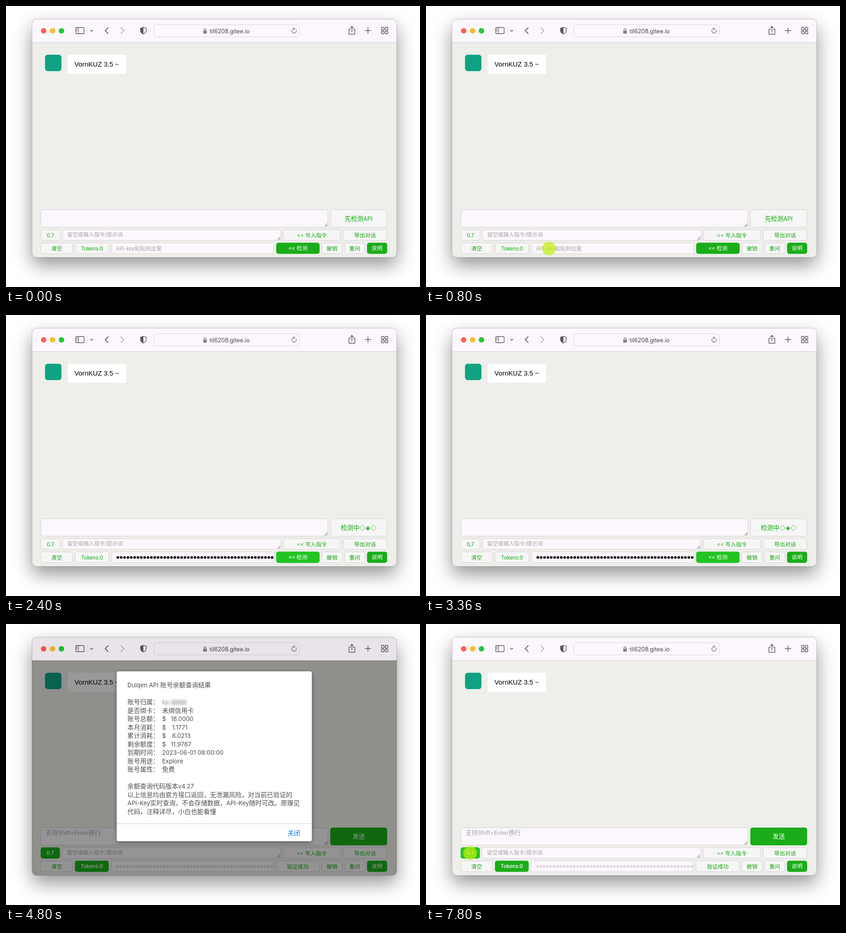
These frames come from a looping animation (907 by 617 pixels, 8000 ms). An HTML page:

```html
<!DOCTYPE html>
<html lang="zh-CN">
<head>
<meta charset="utf-8">
<title>API 余额查询</title>
<style>
  html, body { margin: 0; width: 100%; height: 100%; overflow: hidden; background: #fff; }
  #shadow {
    position: absolute; left: 57px; top: 29px; width: 799px; height: 523px; border-radius: 10px;
    box-shadow: 0 17px 40px rgba(0, 0, 0, .42), 0 0 1px rgba(0, 0, 0, .5);
  }
  svg { position: absolute; left: 0; top: 0; display: block; }
  text { font-family: "Noto Sans CJK SC", "Noto Sans CJK", Inter, sans-serif; white-space: pre; }
  .latin { font-family: Inter, "Noto Sans", sans-serif; font-size: .94em; }
  .arial { font-family: "Liberation Sans", Arial, sans-serif; }
  .icon { fill: none; stroke: #5b585b; stroke-width: 1.4; stroke-linecap: round; stroke-linejoin: round; }

  .phase, #pointer { animation: 8s step-end infinite; }
  #setup { animation-name: setup; }
  #unchecked { animation-name: unchecked; }
  #emptyKey { animation-name: emptyKey; }
  #typedKey { animation-name: typedKey; }
  #checking { animation-name: checking; }
  #ready { animation-name: ready; }
  #dialog { animation-name: dialog; }
  #hover { animation-name: hover; }
  #pointer { animation-name: pointer; }
  @keyframes setup { 0% { opacity: 1 } 50%, 100% { opacity: 0 } }
  @keyframes unchecked { 0% { opacity: 1 } 30%, 100% { opacity: 0 } }
  @keyframes emptyKey { 0% { opacity: 1 } 20%, 100% { opacity: 0 } }
  @keyframes typedKey { 0% { opacity: 0 } 20% { opacity: 1 } 30%, 100% { opacity: 0 } }
  @keyframes checking { 0% { opacity: 0 } 30% { opacity: 1 } 50%, 100% { opacity: 0 } }
  @keyframes ready { 0% { opacity: 0 } 50%, 100% { opacity: 1 } }
  @keyframes dialog { 0% { opacity: 0 } 60% { opacity: 1 } 97.5%, 100% { opacity: 0 } }
  @keyframes hover { 0% { opacity: 0 } 97.5%, 100% { opacity: 1 } }
  @keyframes pointer {
    0% { opacity: 0; transform: translate(269.5px, 532.5px) }
    10% { opacity: 1; transform: translate(269.5px, 532.5px) }
    20% { opacity: 1; transform: translate(636.5px, 533px) }
    30% { opacity: 0; transform: translate(636.5px, 533px) }
    50% { opacity: 1; transform: translate(187.5px, 532px) }
    60% { opacity: 0; transform: translate(187.5px, 532px) }
    97.5%, 100% { opacity: 1; transform: translate(96.5px, 503px) }
  }
</style>
</head>
<body>
<div id="shadow"></div>
<svg id="stage" width="907" height="617" viewBox="0 0 907 617"></svg>
<script>
const GREEN = '#1aad19', BRIGHT = '#22c422', LABEL = '#14a514', PAPER = '#fcf7fc', HINT = '#a6a3a6';

const escape = s => s.replace(/</g, '&lt;');
const runs = s => s.replace(/[\x20-\x7e]+/g, r => `<tspan class="latin">${escape(r)}</tspan>`);
const text = (x, y, s, size, fill, extra = '') =>
  `<text x="${x}" y="${y}" font-size="${size}" fill="${fill}" ${extra}>${runs(s)}</text>`;
const box = (x1, y1, x2, y2, r, fill, extra = '') =>
  `<rect x="${x1}" y="${y1}" width="${x2 - x1}" height="${y2 - y1}" rx="${r}" fill="${fill}" ${extra}/>`;
const group = (id, ...parts) => `<g id="${id}" class="phase">${parts.join('')}</g>`;
const icon = (d, extra = '') => `<path class="icon" d="${d}" ${extra}/>`;

const EDGE = 'stroke="#d6d3d5"';
const field = (x1, y1, x2, y2) => box(x1, y1, x2, y2, 5, PAPER, EDGE);
const grip = (x, y) =>
  `<path d="M${x - 6.5} ${y}l6.5-6.5M${x - 3} ${y}l3-3" stroke="#555" stroke-width="1" fill="none"/>`;

// Buttons are described by their outer left, right and top, with the row height.
const button = (x1, x2, y, s, { fill, size = 11.9, h = 24.5 } = {}) => {
  const mid = (x1 + x2) / 2, base = y + h / 2 + size * .37;
  const look = fill
    ? box(x1, y, x2, y + h, 5, fill)
    : box(x1 + .5, y + .5, x2 - .5, y + h - .5, 5, '#f7f6f6', EDGE);
  return look + text(mid, fill ? base : base + .6, s, size, fill ? '#fff' : LABEL,
    `text-anchor="middle" ${fill ? 'font-weight="500"' : ''}`);
};
const ROW2 = 490.5, ROW3 = 519.7;
const bigButton = (s, fill) => button(710.5, 835, 447, s, { fill, size: 13.5, h: 39 });
const dots = (x, fill) =>
  `<path d="M${x} 532.3h338.5" stroke="${fill}" stroke-width="5.8" stroke-linecap="round" stroke-dasharray="0 7.35"/>`;

const toolbar = [
  ['#fe5f57', 82.5], ['#febc2e', 102], ['#22c637', 121.5],
].map(([c, x]) => `<circle cx="${x}" cy="54.5" r="6" fill="${c}"/>`).join('')
  + box(152.7, 47.2, 171.2, 60.8, 2.5, 'none', 'class="icon"')
  + icon('M158.8 47.5v13M154.8 50.3h2M154.8 52.8h2M154.8 55.3h2', 'style="stroke-width:1.1"')
  + '<path d="M178.5 45v18" stroke="#e6e0e5"/>'
  + icon('M184.8 53l2.8 2.8 2.8-2.8')
  + icon('M223.8 47.7l-6.6 6.5 6.6 6.5', 'style="stroke-width:1.7"')
  + icon('M251.8 47.7l6.6 6.5-6.6 6.5', 'style="stroke:#b3aeb3;stroke-width:1.7"')
  + icon('M301 46.6q3 1.6 6.3 2v5.400q0 4.800-6.300 7.600q-6.300-2.800-6.300-7.600v-5.400q3.300-.4 6.300-2z')
  + '<path d="M301 46.600v15q-6.300-2.800-6.300-7.600v-5.400q3.300-.4 6.300-2z" fill="#5b585b"/>'
  + box(324, 41, 643, 67.8, 6, PAPER, 'stroke="#d9d3d8"')
  + box(432, 54, 440, 60.800, 1.3, '#858285')
  + icon('M433.700 54.500v-2a2.300 2.500 0 0 1 4.600 0v2', 'style="stroke:#858285"')
  + text(446, 59.8, 'til6208.gitee.io', 13.3, '#474547')
  + icon('M635.400 52a5 5 0 1 1-3.600-2.300M630.200 47.400l2.500 2.300-2.500 2.400', 'style="stroke:#777477;stroke-width:1.200"')
  + icon('M754.500 51.300h-3.200v10.700h13v-10.700h-3.200M757.800 57.500v-12.500M754.500 48l3.300-3.300 3.300 3.300')
  + icon('M786.800 54h12.400M793 47.800v12.400')
  + [822.5, 830.7].map(x => [47, 55.200].map(y =>
      box(x, y, x + 5.800, y + 5.800, 1.200, 'none', 'class="icon"')).join('')).join('');

const chat = box(85.500, 107, 121.500, 143, 6, '#0fa383')
  + box(135, 107, 263.500, 149, 4, '#fff')
  + '<text class="arial" x="150" y="133" font-size="14.8">VornKUZ 3.5 ~</text>';

const common = field(76.5, 447.5, 705, 485.5) + grip(704, 484)
  + button(738, 835, ROW2, '导出对话')
  + button(76, 146, ROW3, '清空')
  + button(691.5, 737, ROW3, '撤销')
  + button(741.5, 786.5, ROW3, '重问')
  + button(791, 835, ROW3, '说明', { fill: GREEN });

// The prompt row sits half a pixel further left once the key is accepted.
const promptRow = dx => field(124 + dx, 491, 602.5 + dx / 2, 514.5) + grip(601 + dx, 513)
  + text(134 + dx, 505.800, '留空或输入指令/提示词', 11.8, HINT)
  + button(607.5 + dx, 733, ROW2, '<< 写入指令');

const setup = group('setup',
  button(76, 118.5, ROW2, '0.7'), promptRow(0),
  button(151, 226, ROW3, 'Tokens:0'),
  field(231.500, 520.2, 587, 543.8),
  button(592, 687, ROW3, '<< 检测', { fill: GREEN }),
  group('unchecked', bigButton('先检测API')),
  group('emptyKey', text(241, 536.8, 'API-key粘贴到这里', 11.8, HINT)),
  group('typedKey',
    box(230, 518.700, 588.2, 546, 6, PAPER, 'stroke="#8aadec" stroke-width="3.2"'),
    `<g clip-path="url(#keyClip)">${text(241, 536.6,
      'sk-M4R7Wne2HxQ6Bv3LZKUdN5TgpqYC8uEjfwmA61cXosVPyGhD', 12, '#000')}</g>`),
  group('checking',
    bigButton('检测中◇◈◇'),
    button(592, 687, ROW3, '<< 检测', { fill: BRIGHT }),
    dots(245, '#000')));

const ready = group('ready',
  text(86.500, 463.3, '支持Shift+Enter换行', 13.6, HINT),
  bigButton('发送', GREEN),
  button(76, 118, ROW2, '0.7', { fill: GREEN }), promptRow(-.7),
  button(151, 225, ROW3, 'Tokens:0', { fill: GREEN }),
  field(230.200, 520.2, 586, 543.8), dots(243.800, '#dad7da'),
  button(591, 687, ROW3, '验证成功'));

const INK = '#4d4d4d', SIZE = 13.9;
const lineY = n => 139 + n * 18.5;
const line = (n, s, x = 266) => text(x, lineY(n), s, SIZE, INK);
const facts = [
  ['账号归属：'],
  ['是否绑卡：', '未绑信用卡'],
  ['账号总额：', '$', '18.0000', 361],
  ['本月消耗：', '$', '1.1771', 364],
  ['累计消耗：', '$', '6.0213', 364],
  ['剩余额度：', '$', '11.9787', 361],
  ['到期时间：', '2023-06-01 08:00:00'],
  ['账号用途：', 'Explore'],
  ['账号属性：', '免费'],
].map(([label, value = '', amount = '', x], i) =>
  line(i + 2, label) + line(i + 2, value, 342) + line(i + 2, amount, x || 361)).join('');
const notes = [
  '余额查询代码版本v4.27',
  '以上信息均由官方接口返回，无泄漏风险，对当前已验证的',
  'API-Key实时查询，不会存储数据，API-Key随时可改。原理见',
  '代码，注释详尽，小白也能看懂',
].map((s, i) => line(i + 12, s)).join('');
const smudge = '<path d="M344 167v9" stroke="#777" stroke-width="1.2"/>'
  + `<g filter="url(#blur)">${box(345, 168, 358, 178, 3, '#d4d4d4')}${box(362, 166, 395, 178, 3, '#cfcfcf')}</g>`;

const dialog = group('dialog',
  `<g clip-path="url(#frame)">${box(57, 29, 856, 80, 0, '#000', 'opacity=".075"')}
   ${box(57, 80, 856, 552, 0, '#000', 'opacity=".4"')}</g>`,
  box(242.500, 104, 670, 477, 4, '#fff', 'style="filter:drop-shadow(0 3px 5px rgba(0,0,0,.4))"'),
  line(0, 'Dulqen API 账号余额查询结果'), facts, smudge, notes,
  '<path d="M242.500 438.500h427.500" stroke="#d0d0d0"/>',
  text(617, 463.5, '关闭', 13.8, '#0a7aef'));

document.getElementById('stage').innerHTML = `
  <defs>
    <clipPath id="frame">${box(57, 29, 856, 552, 10, '#000')}</clipPath>
    <clipPath id="keyClip">${box(240, 519, 586, 546, 0, '#000')}</clipPath>
    <filter id="blur" x="-30%" y="-50%" width="160%" height="200%"><feGaussianBlur stdDeviation="2"/></filter>
  </defs>
  <g clip-path="url(#frame)">
    ${box(57, 29, 856, 552, 0, '#eeeeea')}${box(57, 29, 856, 80, 0, PAPER)}
    <path d="M57 80h799" stroke="#d5d0d3"/>
  </g>
  ${box(57.3, 29, 855.7, 552, 10, 'none', 'stroke="#000" stroke-opacity=".2" stroke-width=".8"')}
  ${toolbar}${chat}${common}${setup}${ready}
  ${group('hover', button(76, 118, ROW2, '0.7', { fill: BRIGHT }))}
  ${dialog}
  <circle id="pointer" r="15" fill="#c0ee0c" fill-opacity=".72"/>`;
</script>
</body>
</html>
```
